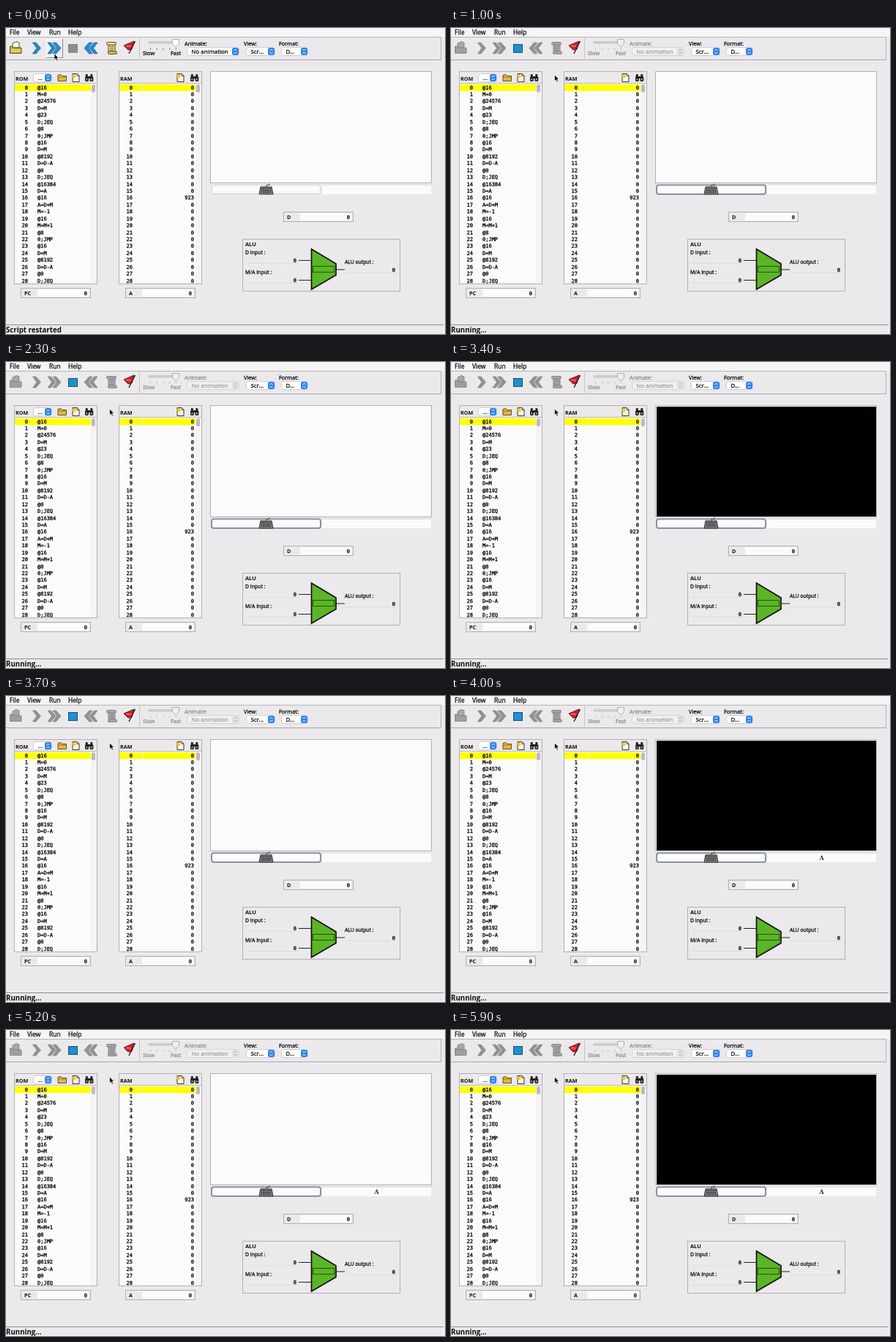
An HTML page with a canvas for the animation above (6000 ms loop, 600 by 418 pixels).

```html
<!DOCTYPE html>
<html lang="en">
<head>
<meta charset="utf-8">
<title>CPU emulator</title>
<style>
html, body { margin: 0; width: 100%; height: 100%; overflow: hidden; background: #ebe9eb; }
canvas { display: block; }
</style>
</head>
<body>
<canvas id="stage" width="600" height="418"></canvas>
<script>
const ctx = document.getElementById('stage').getContext('2d');
const LOOP = 6000;
const START = 200;                                   // run button takes effect
const MOVE = { from: 300, to: 900, a: [66, 35], b: [141.5, 64] };
const KEY_DOWN = [[1600, 2200], [2700, 3300], [3800, 4500], [5200, 6000]];
const SCREEN_BLACK = [[1800, 2300], [2900, 3500], [3900, 4600], [5400, 6000]];

const UI = '"Open Sans", "Noto Sans", sans-serif';
const MONO = '"DejaVu Sans Mono", monospace';
const BG = '#ebe9eb', PAPER = '#fcfbfc', EDGE = '#b2b0b2';
const BLUE = '#1f8fd4', GRAY = '#939193', GOLD = '#e5b53c';
const PROGRAM = ('@16 M=0 @24576 D=M @23 D;JEQ @8 0;JMP @16 D=M @8192 D=D-A @0 D;JEQ @16384 D=A ' +
  '@16 A=D+M M=-1 @16 M=M+1 @8 0;JMP @16 D=M @8192 D=D-A @0 D;JEQ').split(' ');

const within = (ranges, t) => ranges.some(([a, b]) => t >= a && t < b);

function rect(x, y, w, h, fill, stroke) {
  if (fill) { ctx.fillStyle = fill; ctx.fillRect(x, y, w, h); }
  if (stroke) {
    ctx.strokeStyle = stroke; ctx.lineWidth = 1;
    ctx.strokeRect(x + .5, y + .5, w - 1, h - 1);
  }
}

function round(x, y, w, h, r, fill, stroke, width = 1) {
  ctx.beginPath();
  ctx.roundRect(x, y, w, h, r);
  if (fill) { ctx.fillStyle = fill; ctx.fill(); }
  if (stroke) { ctx.strokeStyle = stroke; ctx.lineWidth = width; ctx.stroke(); }
}

function poly(points, fill, stroke, width = 1, closed = true) {
  ctx.beginPath();
  for (let i = 0; i < points.length; i += 2) ctx.lineTo(points[i], points[i + 1]);
  if (closed) ctx.closePath();
  if (fill) { ctx.fillStyle = fill; ctx.fill(); }
  if (stroke) { ctx.strokeStyle = stroke; ctx.lineWidth = width; ctx.stroke(); }
}

const line = (x1, y1, x2, y2, color, width = 1) => poly([x1, y1, x2, y2], null, color, width, false);

// Regular text gets a hairline outline to match the heavier desktop rendering.
function text(s, x, y, size, { color = '#111', weight = 400, font = UI, align = 'left' } = {}) {
  ctx.font = `${weight} ${size}px ${font}`;
  ctx.fillStyle = ctx.strokeStyle = color;
  ctx.textAlign = align;
  ctx.fillText(s, x, y);
  if (weight === 400) { ctx.lineWidth = .3; ctx.strokeText(s, x, y); }
}

const bold = (s, x, y, size) => text(s, x, y, size, { weight: 700 });
const mono = (s, x, y, align = 'right') => text(s, x, y, 7, { font: MONO, align, color: '#000' });

function at(x, y, draw) {
  ctx.save();
  ctx.translate(x, y);
  draw();
  ctx.restore();
}

function chevron(x, dir, color, edge) {
  at(x, 27.5, () => {
    ctx.scale(dir, 1);
    poly([-5.5, -7.5, -1, -7.5, 5.5, 0, -1, 7.5, -5.5, 7.5, 0, 0], color, edge, .7);
  });
}

function combo(x, y, w, label, active = true) {
  round(x + .5, y + .5, w - 1, 11, 3, active ? '#fff' : '#f1eff1', active ? '#d0ced0' : '#d6d4d6');
  text(label, x + 6.5, y + 9, 7.9, { color: active ? '#111' : '#a5a3a5' });
  const cx = x + w - 5.5, cy = y + 6;
  round(cx - 4.5, cy - 5, 9, 10, 2.5, active ? '#2f83ee' : '#e3e1e3');
  const arrow = active ? '#fff' : '#aaa8aa';
  poly([cx - 2, cy - 1, cx, cy - 3, cx + 2, cy - 1], null, arrow, 1, false);
  poly([cx - 2, cy + 1, cx, cy + 3, cx + 2, cy + 1], null, arrow, 1, false);
}

function folder(x, y) {
  poly([x, y + 9, x, y + 1, x + 4, y, x + 6, y + 2, x + 11.5, y + 2, x + 11.5, y + 9], GOLD, '#594214', .9);
  line(x, y + 3.5, x + 11, y + 3.5, '#8a6a22', .8);
}

function page(x, y) {
  poly([x, y, x + 6, y, x + 9, y + 3, x + 9, y + 11, x, y + 11], '#fffbe0', '#333', 1);
  poly([x + 6, y, x + 6, y + 3, x + 9, y + 3], '#ddd', '#333', .7);
  ctx.beginPath();
  ctx.arc(x + 2, y + 3, 2.6, 0, 7);
  ctx.fillStyle = '#efc32d';
  ctx.fill();
}

function binoculars(x, y) {
  for (const dx of [0, 6.5]) {
    round(x + dx + .8, y, 3, 4, 1, '#222');
    round(x + dx, y + 3, 4.8, 7, 1.5, '#222');
    rect(x + dx + 1.5, y + 6, 1.6, 2.5, '#aaa');
  }
  rect(x + 4, y + 3, 3.5, 3, '#222');
}

function openIcon(on) {
  const ink = on ? '#4c421d' : '#858385';
  poly([9, 27, 9, 21, 14, 18.5, 18, 20, 18, 27], on ? '#fffbdc' : '#a9a7a9', ink, .9);
  poly([5.5, 34.5, 5.5, 25, 9, 25, 10, 27, 21, 27, 21, 34.5], on ? '#c5b74a' : '#a09ea0', ink, .9);
  rect(7, 29, 13, 4, on ? '#dccf62' : '#a09ea0');
}

function scrollIcon(on) {
  const ink = on ? '#54451b' : '#858385';
  poly([140, 21, 149, 21, 149, 34, 140, 34], on ? '#ead98a' : '#a7a5a7', ink);
  round(137.5, 19.5, 13, 3.5, 1.5, on ? '#f4e7a4' : '#a7a5a7', ink);
  round(139.5, 32, 12, 3.5, 1.5, on ? '#dac46b' : '#a7a5a7', ink);
  for (const y of [25.5, 28, 30.5]) line(142, y, 147, y, ink, .8);
}

function flagIcon() {
  poly([161, 24, 175, 18, 172, 29, 167, 30], '#d71f2b', '#4b1115', .9);
  line(176.5, 18, 168, 35, '#3b2020', 1.5);
  line(164, 24.5, 171, 25, '#f3a0a0', 1);
}

function raisedButton(x, y, w, h) {
  rect(x, y, w, h, '#f0eef0');
  rect(x, y, w, 1, '#fff');
  rect(x, y, 1, h, '#fff');
  rect(x, y + h - 1, w, 1, '#8d8b8d');
  rect(x + w - 1, y, 1, h, '#8d8b8d');
}

function toolbar(running) {
  const idle = !running;
  const label = idle ? '#111' : '#929092';
  const blue = idle ? BLUE : GRAY, edge = idle ? '#164b73' : '#858385';
  rect(0, 0, 600, 12, '#f6f5f6');
  [['File', 5], ['View', 29], ['Run', 59], ['Help', 85]].forEach(([s, x]) => text(s, x, 9, 8.5));
  rect(0, 12, 595, 1, '#b5b3b5');
  rect(0, 43, 595, 1, '#a9a7a9');
  rect(594, 13, 1, 30, '#b5b3b5');

  if (idle) raisedButton(55, 15, 23, 26);
  openIcon(idle);
  chevron(42, 1, blue, edge);
  chevron(62.5, 1, blue, edge);
  chevron(69.5, 1, blue, edge);
  rect(85, 22, 13, 12, idle ? '#8e8c8e' : BLUE, idle ? '#858385' : '#164b73');
  chevron(119.5, -1, blue, edge);
  chevron(112.5, -1, blue, edge);
  scrollIcon(idle);
  flagIcon();
  rect(182, 14, 1, 28, '#c5c3c5');

  round(195, 18.5, 41, 2.5, 1, '#d0ced0', '#bbb9bb', .6);
  for (let i = 0; i < 5; i++) rect(197 + i * 8.7, 27, 1, 3, idle ? '#8f8d8f' : '#bfbdbf');
  poly([227.5, 15.5, 236.5, 15.5, 236.5, 21.5, 232, 26, 227.5, 21.5], idle ? '#fff' : '#f0eef0', '#b0aeb0');
  text('Slow', 187, 37, 7.5, { color: label });
  text('Fast', 225, 37, 7.4, { color: label });
  text('Animate:', 244, 24, 7.4, { color: label });
  combo(247, 26, 72, 'No animation', idle);
  text('View:', 325, 24, 7.4);
  combo(328, 26, 40, 'Scr...');
  text('Format:', 373, 24, 7.4);
  combo(376, 26, 37, 'D...');
}

function memory(x, title, cell) {
  rect(x, 59, 114, 291, BG, EDGE);
  rect(x + 1, 75, 112, 274, PAPER);
  rect(x + 1, 75, 112, 1, '#bbb9bb');
  rect(x + 1, 77, 104, 9, '#ffff00');
  rect(x + 105, 76, 8, 273, '#f5f4f5');
  round(x + 106, 77, 5, 11, 2.5, '#bcbabc');
  bold(title, x + 2, 72, 7.2);
  for (let i = 0; i < 29; i++) {
    const y = 83.6 + i * 9.43;
    mono(i, x + 19, y);
    cell(i, y);
  }
}

function register(x, y, name) {
  rect(x, y, 96, 14, BG, EDGE);
  rect(x + 23, y + 2, 70, 10, PAPER);
  bold(name, x + 5, y + 10, 7.2);
  mono(0, x + 91, y + 9.6);
}

function keyboardIcon() {
  poly([348, 217, 363, 217, 365, 227, 346, 227], '#8a8a8a', '#2c2c2c', 1);
  for (let r = 0; r < 3; r++)
    for (let c = 0; c < 6; c++) rect(348.6 + c * 2.4, 218.5 + r * 2.5, 1.7, 1.6, '#333');
  poly([356, 217, 356, 214.5, 360, 214.5, 360, 212.5], null, '#333', .9, false);
}

function display(t, running) {
  rect(279, 59, 303, 153, PAPER, EDGE);
  if (within(SCREEN_BLACK, t)) rect(281, 61, 300, 150, '#000');
  rect(432, 215, 149, 12, PAPER);
  rect(432, 214, 149, 1, '#dad8da');
  if (running) round(281, 214.5, 149, 12.5, 3, PAPER, '#8793a3', 2);
  else round(281.5, 214.5, 148, 12, 3, PAPER, '#d0ced0');
  keyboardIcon();
  if (within(KEY_DOWN, t))
    text('A', 506.5, 223.5, 8.5, { weight: 700, font: '"Liberation Serif", serif', align: 'center' });
}

function alu() {
  rect(323, 288, 216, 72, null, EDGE);
  bold('ALU', 327, 298, 7.4);
  text('D Input :', 327, 308.7, 6.9);
  text('M/A Input :', 327, 335.7, 7);
  text('ALU output :', 463, 321.7, 6.8);
  for (const [x, y] of [[328, 321], [328, 348], [464, 334]]) rect(x, y, 70, 1, '#dddbdd');
  for (const y of [317, 344]) {
    mono(0, 397, y + 2.6);
    line(400, y + .5, 417, y + .5, '#222');
  }
  line(451, 330, 463, 330, '#222');
  mono(0, 532, 332.6);
  poly([417.5, 302, 451, 322, 451, 337.5, 417.5, 357], '#5cb526', '#111', 1.7);
  rect(419, 325, 30, 9, null, '#1d5610');
}

function cursor(t) {
  const p = Math.min(1, Math.max(0, (t - MOVE.from) / (MOVE.to - MOVE.from)));
  const e = p * p * (3 - 2 * p);
  const [x, y] = MOVE.a.map((v, i) => v + (MOVE.b[i] - v) * e);
  at(x, y, () => poly([0, 0, 0, 8.5, 2, 6.8, 3.4, 10, 5, 9.3, 3.6, 6.2, 6, 6], '#000', '#fff', .7));
}

function draw(t) {
  const running = t >= START;
  rect(0, 0, 600, 418, BG);
  toolbar(running);

  memory(11, 'ROM', (i, y) => mono(PROGRAM[i], 43, y, 'left'));
  combo(37, 62, 26, '...');
  folder(71, 63.5);
  page(91, 62.5);
  binoculars(108, 63);

  memory(154, 'RAM', (i, y) => mono(i === 16 ? 923 : 0, 257, y));
  rect(187, 77, 1, 9, '#f4f4a0');
  page(234, 62.5);
  binoculars(252, 63);

  register(20, 355, 'PC');
  register(163, 355, 'A');
  register(379, 251, 'D');
  display(t, running);
  alu();

  rect(0, 405, 598, 1, '#8e8c8e');
  rect(597, 406, 1, 12, '#f9f8f9');
  rect(0, 417, 598, 1, '#f9f8f9');
  bold(running ? 'Running...' : 'Script restarted', 0, 415.5, 9.7);
  cursor(t);
}

const begin = performance.now();
function tick() {
  draw((performance.now() - begin) % LOOP);
  requestAnimationFrame(tick);
}
tick();
</script>
</body>
</html>
```
